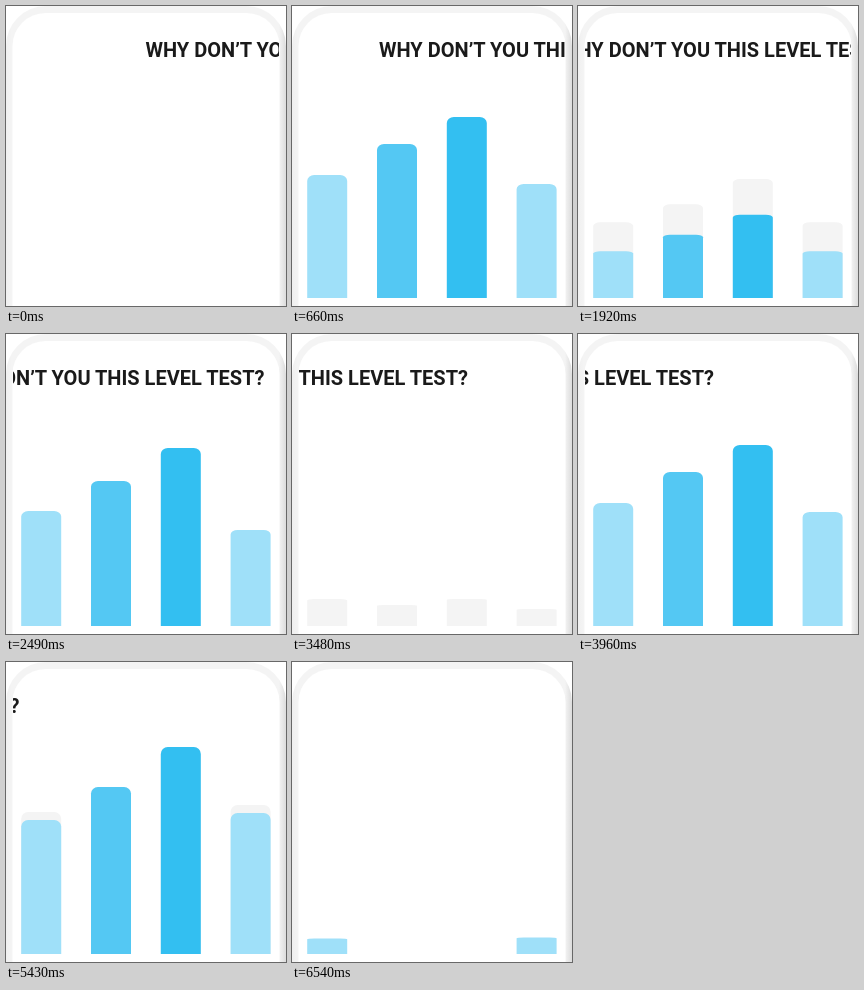
Animation of 280 by 300 pixels, one loop 6600 ms. Source, as an HTML page:

```html
<!DOCTYPE html>
<html lang="en">
<head>
<meta charset="utf-8">
<title>Level test</title>
<style>
  html, body { margin: 0; width: 100%; height: 100%; overflow: hidden; background: #fff; }
  svg { display: block; width: 280px; height: 300px; }
  text { font: 700 20px Roboto, Arial, sans-serif; fill: #1a1a1a; }
</style>
</head>
<body>
<svg viewBox="0 0 280 300">
  <defs>
    <linearGradient id="rim">
      <stop offset="0" stop-color="#f0f0f0"/>
      <stop offset=".02" stop-color="#f4f4f4"/>
      <stop offset=".975" stop-color="#f4f4f4"/>
      <stop offset="1" stop-color="#dcdcdc"/>
    </linearGradient>
    <clipPath id="screen"><rect x="7" y="7" width="266" height="293"/></clipPath>
  </defs>
  <rect width="280" height="360" rx="40" fill="url(#rim)"/>
  <rect x="6.5" y="7" width="267" height="350" rx="33" fill="#fff"/>
  <g id="bars"></g>
  <g clip-path="url(#screen)"><text id="headline" y="51">WHY DON’T YOU THIS LEVEL TEST?</text></g>
</svg>
<script>
const LOOP = 6600, TICK = 30, CYCLE = 1650, BAR_STEP = 66;
const BASE = 292, WIDTH = 40;
const FULL = [144, 178, 207, 152];
const COLORS = ['#9fe0f9', '#54c8f3', '#33bff1', '#9fe0f9'];
const NONE = [0, 0, 0, 0];
const DIP = [111, 140, 174, 75];

// Each key is [step within the cycle, heights of the four bars].
const fillKeys = [
  [0, NONE], [2, NONE],
  [5, [70, 95, 125, 70]],
  [7, [134, 167, 207, 141]],
  [8, [131, 163, 184, 132]],
  [12, [115, 145, 178, 96]],
  [13, DIP], [15, DIP],
  [18, [151, 187, 218, 160]],
  [19, FULL], [20, FULL],
  [22, [100, 90, 100, 110]],
  [23, [55, 6, 6, 60]],
  [24, [15.5, 0, 0, 16.5]],
  [25, NONE]
];
const ghostKeys = [
  [0, NONE],
  [2, [27, 21, 27, 17]],
  [5, [100, 130, 165, 105]],
  [7, [142, 167, 207, 149]],
  [8, NONE], [25, NONE]
];

const svgNS = 'http://www.w3.org/2000/svg';
const barGroup = document.getElementById('bars');
const headline = document.getElementById('headline');

function makeBar(index, color) {
  const path = document.createElementNS(svgNS, 'path');
  path.setAttribute('fill', color);
  barGroup.append(path);
  return path;
}
const ghosts = FULL.map((_, i) => makeBar(i, '#f4f4f4'));
const fills = FULL.map((_, i) => makeBar(i, COLORS[i]));

function heightAt(keys, step, bar) {
  const next = keys.findIndex(key => key[0] > step);
  const [s0, a] = keys[next - 1], [s1, b] = keys[next];
  return a[bar] + (b[bar] - a[bar]) * (step - s0) / (s1 - s0);
}

// Corners flatten with the bar, as if it were scaled vertically.
function setBar(path, bar, height) {
  const x = 15.2 + bar * 69.8, r = 7;
  const ry = r * height / FULL[bar];
  path.setAttribute('d', height <= 0 ? '' :
    `M${x} ${BASE}V${BASE - height + ry}a${r} ${ry} 0 0 1 ${r} ${-ry}` +
    `h${WIDTH - 2 * r}a${r} ${ry} 0 0 1 ${r} ${ry}V${BASE}z`);
}

function render(time) {
  const t = time % LOOP;
  const scroll = Math.max(0, Math.floor(t / TICK) - 1);
  headline.setAttribute('x', 139.5 - 2.5 * scroll);

  const step = Math.floor((t % CYCLE) / BAR_STEP);
  for (let i = 0; i < FULL.length; i++) {
    setBar(ghosts[i], i, heightAt(ghostKeys, step, i));
    setBar(fills[i], i, heightAt(fillKeys, step, i));
  }
}

const start = performance.now();
function frame() {
  render(performance.now() - start);
  requestAnimationFrame(frame);
}
frame();
</script>
</body>
</html>
```
